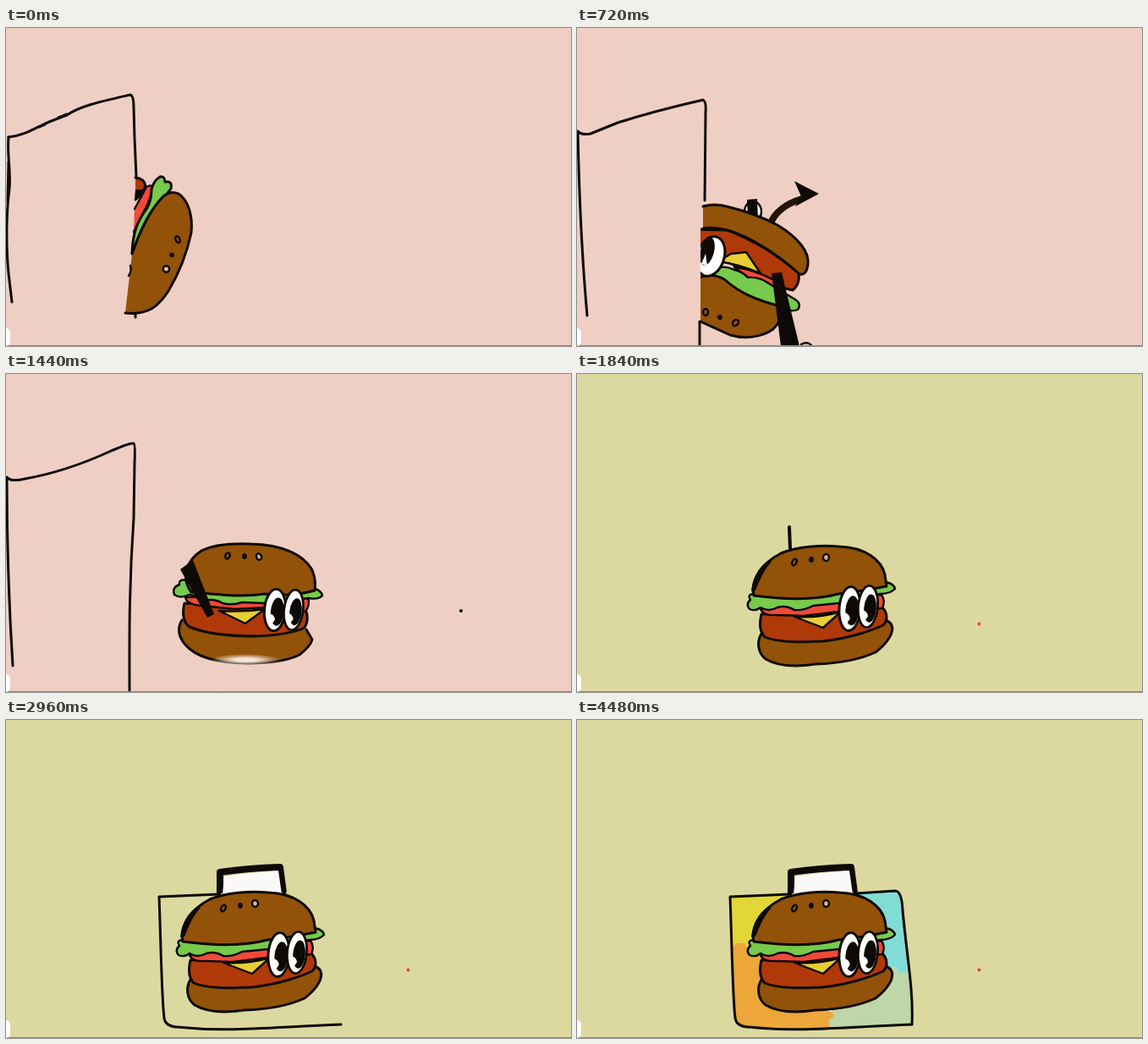
An HTML page that plays this animation: 668 by 376 pixels, repeating every 4640 ms.

```html
<!DOCTYPE html>
<html lang="en">
<head>
<meta charset="utf-8">
<title>Burger box</title>
<style>
html, body { margin: 0; width: 100%; height: 100%; overflow: hidden; background: #efcfc3; }
svg { display: block; width: 668px; height: 376px; }

.ink { fill: none; stroke: #0d0905; stroke-width: 3; stroke-linecap: round; stroke-linejoin: round; }
.bun { fill: #925208; }
.patty { fill: #b0390a; }
.tomato { fill: #f1493a; }
.lettuce { fill: #76ca4c; }
.cheese { fill: #e7cf35; }
.white { fill: #fbf9f8; }
.black { fill: #0d0905; stroke: none; }
.thin { stroke-width: 2.4; }

/* Every track shares one loop of 58 ticks, 80 ms each. */
.cue, .draw { animation: 4640ms step-end infinite; }
.late { opacity: 0; }
.draw { stroke-dasharray: 1 2; stroke-dashoffset: 1.01; }
.fill { fill: none; stroke-linecap: butt; stroke-linejoin: round; }

.door-a { animation-name: door-a; }
.door-b { animation-name: door-b; }
.door-c { animation-name: door-c; }
.peek { animation-name: peek; }
.roll { animation-name: roll; }
.tumble { animation-name: tumble; }
.land { animation-name: land; }
.speck { animation-name: speck; }
.scene { animation-name: scene; }
.thick { animation-name: thick; }
.pane { animation-name: pane; }
.card { animation-name: card; }
.post { animation-name: post; }
.grip { animation-name: grip; }
.side { animation-name: side; }
.close { animation-name: close; }
.yellow { animation-name: yellow; }
.orange { animation-name: orange; }
.green { animation-name: green; }
.cyan { animation-name: cyan; }

@keyframes door-a { 8.62% { opacity: 0 } }
@keyframes door-b { 8.62% { opacity: 1 } 25.86% { opacity: 0 } }
@keyframes door-c { 25.86% { opacity: 1 } }
@keyframes peek { 5.17% { opacity: 0 } }
@keyframes roll {
  5.17% { opacity: 1; transform: translate(151px, 265px) rotate(125deg) }
  6.89% { opacity: 1; transform: translate(165px, 271px) rotate(148deg) }
  8.62% { opacity: 1; transform: translate(182px, 280px) rotate(172deg) }
  10.34% { opacity: 0 }
  20.68% { opacity: 1; transform: translate(226px, 284px) rotate(245deg) }
  22.41% { opacity: 1; transform: translate(255px, 278px) rotate(300deg) }
  24.13% { opacity: 1; transform: translate(280px, 273px) rotate(342deg) }
  25.86% { opacity: 0 }
}
@keyframes tumble { 10.34% { opacity: 1 } 20.68% { opacity: 0 } }
@keyframes land { 25.86% { opacity: 1 } }
@keyframes speck { 27.58% { opacity: 1 } }
@keyframes scene { 37.93% { opacity: 1 } }
@keyframes post { 39.65% { stroke-dashoffset: 0 } }
@keyframes grip {
  0%, 39.65% { stroke-dashoffset: 1.01; animation-timing-function: steps(4) }
  46.55%, to { stroke-dashoffset: 0 }
}
@keyframes thick { 48.27% { opacity: 1 } }
@keyframes pane { 51.72% { opacity: 1 } }
@keyframes side {
  0%, 55.17% { stroke-dashoffset: 1.01; animation-timing-function: steps(5) }
  63.79%, to { stroke-dashoffset: 0 }
}
@keyframes close {
  0%, 63.79% { stroke-dashoffset: 1.01; animation-timing-function: steps(2) }
  67.24%, to { stroke-dashoffset: 0 }
}
@keyframes card { 68.96% { opacity: 1 } }
@keyframes yellow {
  0%, 68.96% { stroke-dashoffset: 1.01; animation-timing-function: steps(1) }
  70.68%, to { stroke-dashoffset: 0 }
}
@keyframes orange {
  0%, 70.68% { stroke-dashoffset: 1.01; animation-timing-function: steps(2) }
  74.13%, to { stroke-dashoffset: 0 }
}
@keyframes green {
  0%, 74.13% { stroke-dashoffset: 1.01; animation-timing-function: steps(6) }
  84.48%, to { stroke-dashoffset: 0 }
}
@keyframes cyan {
  0%, 86.2% { stroke-dashoffset: 1.01; animation-timing-function: steps(5) }
  94.82%, to { stroke-dashoffset: 0 }
}
</style>
</head>
<body>
<svg viewBox="0 0 668 376">
  <defs>
    <radialGradient id="glow">
      <stop offset=".3" stop-color="#f6e4da"/>
      <stop offset="1" stop-color="#f6e4da" stop-opacity="0"/>
    </radialGradient>
    <clipPath id="outside"><path d="M150 0H668V376H143Z"/></clipPath>
    <clipPath id="edge"><path d="M146 0H668V376H146Z"/></clipPath>
    <clipPath id="yellow-area"><path d="M181 208L250 205L240 280L213 273L204 275L198 264L190 263L183 268Z"/></clipPath>
    <clipPath id="orange-area"><path d="M183 268L190 263L198 264L204 275L213 273L290 300V342L304 346L306 354L300 365Q240 368 202 363Q188 362 187 352Z"/></clipPath>
    <clipPath id="green-area"><path d="M290 300L368 290L376 292L382 299L394 297L396 360L300 365L297 356L304 350L300 342Z"/></clipPath>
    <clipPath id="cyan-area"><path d="M330 205L376 202Q384 202 385 225L394 297L382 299L376 292L366 294L340 250Z"/></clipPath>

    <g id="eye">
      <ellipse class="ink" rx="12.5" ry="26" style="fill:#fff"/>
      <ellipse class="black" cx="3" cy="2" rx="8" ry="17.5"/>
      <path d="M-6 5Q0 6 1 12L-3 19Z" fill="#fff"/>
    </g>

    <g id="burger">
      <path class="ink bun" d="M218 307C212 317 214 330 223 337C238 346 262 346 282 343C318 342 340 335 353 329C369 317 375 304 372 297Q370 292 363 291"/>
      <path class="ink patty" d="M218 284C215 297 217 306 222 311C238 318 268 317 290 316C320 313 347 304 362 297C368 291 367 282 361 276L310 281Z"/>
      <path class="ink thin tomato" d="M217 278Q220 286 235 285L268 286L309 281L361 277Q365 268 360 261L300 268L240 273Z"/>
      <path class="ink thin cheese" d="M257 287L291 300L312 281Q285 289 257 287Z"/>
      <path class="ink thin lettuce" d="M208 260Q201 261 205 267Q199 272 204 278Q211 281 217 276Q226 282 237 276Q247 273 257 279Q268 280 279 274L309 271L358 260Q370 260 376 254Q375 248 365 246L300 262Z"/>
      <path class="ink bun" d="M209 262C205 244 218 224 241 212C260 204 288 202 310 204C341 205 360 220 364 237L366 251Q337 257 309 260C280 268 240 266 209 262Z"/>
      <path class="black" d="M206 257C207 243 214 228 227 220L230 222C220 233 217 242 211 256Z"/>
      <ellipse class="ink thin" cx="257" cy="222.500" rx="2.600" ry="4" transform="rotate(25 257 222.500)"/>
      <ellipse class="black" cx="277" cy="219.500" rx="2.800" ry="3.400"/>
      <ellipse class="ink thin" cx="294.500" cy="217" rx="3.500" ry="4" style="fill:#d4b48e"/>
      <use href="#eye" transform="translate(322.500 277.500) rotate(4)"/>
      <use href="#eye" transform="translate(344 275) rotate(5) scale(.92 .95)"/>
    </g>
  </defs>

  <rect width="668" height="376" fill="#efcfc3"/>

  <g class="ink">
    <g class="cue door-a">
      <path d="M3 129C20 127 30 121 42 115C55 109 64 106 72 103C88 92 112 87 147 79Q151 80 151 94L152 130L154 176M39 117L46 114M62 106L72 102"/>
      <path d="M3 129C1 150 6 170 4 190C0 220 0 260 3 290L7 324M3 158L2 205"/>
    </g>
    <g class="cue late door-b">
      <path d="M1 122Q5 127 16 125L48 112Q92 98 149 85Q153 87 152 100L151 204M145 347V376"/>
      <path d="M1 123C2 175 4 250 12 340"/>
    </g>
    <g class="cue late door-c">
      <path d="M1 122Q6 128 22 124C62 117 98 103 124 91Q147 81 151 82Q153 83 152 105L151 170C145 255 146 320 146 376"/>
      <path d="M1 123C1 180 2 250 8 345"/>
    </g>
  </g>

  <!-- Peeking out sideways -->
  <g class="cue peek">
    <path class="ink patty" d="M153 177Q164 178 165 187Q160 198 153 203"/>
    <path class="black" d="M153 191L162 191L155 201L152 202Z"/>
    <path class="ink thin tomato" d="M152 214L166 188Q172 184 174 190L168 207L151 241"/>
    <path class="ink lettuce" d="M149 266C150 240 156 228 166 214Q172 205 172 191Q174 181 182 176Q188 175 188 182Q197 180 195 190L189 198"/>
    <path class="ink bun" d="M149 267C156 246 169 216 186 199Q195 192 204 196C216 204 221 223 219 242C214 266 204 291 192 311C181 328 169 340 141 337M153 339V342"/>
    <path class="ink thin" d="M147 281Q149 287 145 293"/>
    <ellipse class="ink thin" cx="203" cy="250" rx="2.500" ry="4" transform="rotate(-25 203 250)"/>
    <circle class="black" cx="196" cy="268.500" r="2.800"/>
    <ellipse class="ink thin" cx="189.500" cy="285" rx="3.700" ry="3.700" style="fill:#e3c6a8"/>
  </g>

  <g clip-path="url(#outside)">
    <g class="cue late roll">
      <g transform="translate(-290 -275)">
        <use href="#burger"/>
        <path class="black" d="M211 238L224 228L248 288L240 290Z"/>
      </g>
    </g>
  </g>

  <!-- Upside down -->
  <g class="cue late tumble" clip-path="url(#edge)">
    <path class="ink" d="M228 233Q236 211 266 202" style="stroke:#21150a;stroke-width:8;stroke-linecap:butt"/>
    <path class="black" d="M257 181L286 196L258 211L265 199Z"/>
    <ellipse class="ink thin" cx="208" cy="217" rx="10" ry="12" style="fill:#fff"/>
    <path class="black" d="M201 203L213 202L214 226L202 225Z"/>
    <path class="ink patty" d="M140 238L178 239Q225 257 262 290Q264 303 255 310L230 304L205 291L172 273L140 270Z"/>
    <path class="ink bun" d="M149 211Q162 207 177 211C198 216 220 224 237 233C262 248 275 265 273 280Q271 293 263 291C240 270 208 248 178 239Q160 235 149 237"/>
    <path class="ink thin cheese" d="M167 276L182 267L200 265L217 290Q190 279 167 276Z"/>
    <path class="ink thin tomato" d="M186 283Q206 284 237 300L235 308L204 296Z"/>
    <path class="ink thin lettuce" d="M158 289Q170 278 186 286Q194 287 202 295Q215 294 225 301L258 321Q266 326 261 333Q253 336 246 332L220 330L175 309Z"/>
    <path class="ink bun" d="M140 297Q158 288 174 297C192 313 212 322 241 329Q243 346 232 356C218 366 198 368 181 363L146 347L138 342Z"/>
    <ellipse class="ink thin" cx="152" cy="336" rx="3" ry="4"/>
    <circle class="black" cx="169" cy="342" r="3"/>
    <ellipse class="ink thin" cx="187.500" cy="348.500" rx="3" ry="4" transform="rotate(45 187.500 348.500)"/>
    <ellipse class="ink" cx="158" cy="270" rx="16" ry="24" transform="rotate(18 158 270)" style="fill:#fff"/>
    <ellipse class="black" cx="154" cy="264" rx="8" ry="17" transform="rotate(14 154 264)"/>
    <path d="M147 279L152 267L154 281Z" fill="#fff"/>
    <path class="black" d="M230 290L242 289L263 376H241Z"/>
    <path class="ink thin" d="M265 374Q272 370 277 375"/>
  </g>

  <!-- Landed -->
  <g class="cue late land">
    <path class="ink bun" d="M208 291C202 301 204 310 211 319C225 336 250 341 285 342C315 342 335 338 347 332Q360 322 362 314L355 302"/>
    <ellipse cx="283" cy="338" rx="42" ry="7" fill="url(#glow)"/>
    <path class="ink patty" d="M211 271C208 284 210 294 217 299C238 308 270 310 295 310C322 309 340 306 353 300Q359 290 354 278L305 274Z"/>
    <path class="ink thin tomato" d="M212 264Q214 273 232 274L270 278L310 276L354 281Q360 273 357 264L300 262Z"/>
    <path class="ink thin cheese" d="M252 280L283 295L306 278Q280 282 252 280Z"/>
    <path class="ink thin lettuce" d="M213 244Q204 242 205 249Q196 252 199 261Q207 266 216 261Q227 262 234 268Q246 265 256 271Q267 274 279 270L305 271L358 265Q370 267 374 262Q373 256 363 253L300 255Z"/>
    <path class="ink bun" d="M219 258C206 240 214 220 231 209C247 201 270 200 290 201C328 202 351 214 361 230Q367 242 365 256Q335 264 306 260C278 264 250 261 219 258Z"/>
    <path class="black" d="M206 231L221 220L246 284L238 288Z"/>
    <ellipse class="ink thin" cx="262" cy="215" rx="2.600" ry="3.800" transform="rotate(25 262 215)"/>
    <ellipse class="black" cx="282" cy="215.500" rx="2.800" ry="3.500"/>
    <ellipse class="ink thin" cx="299" cy="216" rx="3" ry="3.800" transform="rotate(-20 299 216)" style="fill:#d4b48e"/>
    <use href="#eye" transform="translate(318 279) rotate(5) scale(1 .95)"/>
    <use href="#eye" transform="translate(340 279) rotate(7) scale(.9 .92)"/>
  </g>
  <circle class="black cue late speck" cx="538" cy="280" r="2"/>

  <!-- Lunch box -->
  <g class="cue late scene">
    <rect width="668" height="376" fill="#dcd9a0"/>
    <circle cx="475.500" cy="295.500" r="2" fill="#f1452f"/>

    <path class="cue late card white" d="M181 209C183 260 184 330 187 352Q188 362 202 363C260 369 300 364 396 360C398 320 390 280 385 225Q384 202 376 202L330 205Z"/>
    <g class="fill">
      <g clip-path="url(#yellow-area)"><path class="draw yellow" pathLength="1" d="M215 200V285" stroke="#e2d736" stroke-width="75"/></g>
      <g clip-path="url(#orange-area)"><path class="draw orange" pathLength="1" d="M205 255V340H312" stroke="#eca63a" stroke-width="66"/></g>
      <g clip-path="url(#green-area)"><path class="draw green" pathLength="1" d="M286 328H400" stroke="#bfd6a8" stroke-width="92"/></g>
      <g clip-path="url(#cyan-area)"><path class="draw cyan" pathLength="1" d="M360 198V304" stroke="#82dcd6" stroke-width="100"/></g>
    </g>

    <g class="ink">
      <path class="draw side" pathLength="1" d="M252 206L181 209C183 260 184 330 187 352Q188 362 202 363C260 369 300 364 396 360"/>
      <path class="draw close" pathLength="1" d="M396 360C398 320 390 280 385 225Q384 202 376 202L330 205"/>
      <path class="draw post" pathLength="1" d="M251 181L252 206" stroke-width="4"/>
      <path class="draw grip" pathLength="1" d="M251 180L325 173L329 205" stroke-width="4"/>
    </g>
    <path class="cue late thick ink" d="M253 205L253 180Q288 175 324 174L328 204" style="stroke-width:8;stroke-linecap:butt"/>
    <path class="cue late pane white" d="M258 185Q290 180 322 178L326 206H256Z"/>
    <use href="#burger"/>
  </g>

  <path d="M0 375.500H668" stroke="#93877c"/>
  <rect x="-10" y="355" width="15" height="21" rx="5" fill="#fff"/>
</svg>
</body>
</html>
```
